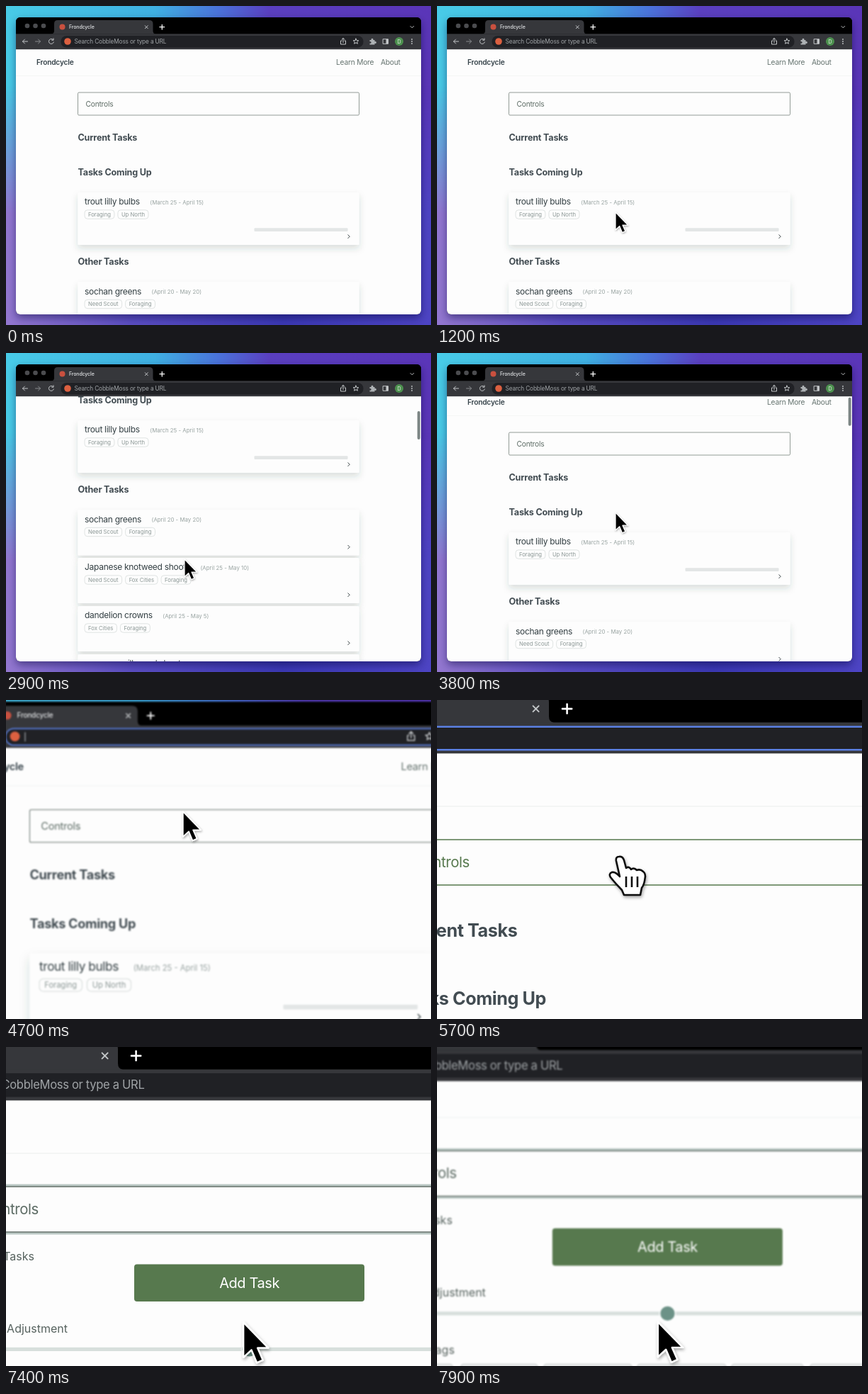
These frames come from a looping animation (600 px wide and 450 px high, 8 s). An HTML page:

```html
<!DOCTYPE html>
<html lang="en">
<head>
<meta charset="utf-8">
<title>Seasonal tasks</title>
<style>
  html, body { margin: 0; width: 100%; height: 100%; overflow: hidden; background: #4b3fc0; }
  svg { display: block; width: 100vw; height: 100vh; }
  text { font-family: Inter, "Open Sans", sans-serif; letter-spacing: -.02em; }
  .h { font-weight: 700; font-size: 12.6px; letter-spacing: -.016em; fill: #424c52; }
  .title { font-size: 12px; letter-spacing: -.024em; fill: #333f43; }
  .date { font-size: 7.85px; letter-spacing: 0; fill: #98a3a1; }
  .tag { font-size: 7.7px; letter-spacing: 0; fill: #8a9694; }
  .nav { font-size: 10.2px; fill: #65736f; }
  .label { font-size: 8px; letter-spacing: 0; fill: #56625e; }
  .icon { fill: none; stroke: #c3c6c8; stroke-width: 1; stroke-linecap: round; stroke-linejoin: round; }
</style>
</head>
<body>
<svg id="stage" viewBox="0 0 600 450" xmlns="http://www.w3.org/2000/svg">
  <defs>
    <linearGradient id="sky" x1="0" y1="0" x2="1" y2="0">
      <stop offset="0" stop-color="#48cbe7"/><stop offset=".35" stop-color="#3fb0e2"/>
      <stop offset=".5" stop-color="#4a72da"/><stop offset=".62" stop-color="#5a3fc0"/>
      <stop offset="1" stop-color="#5a35b8"/>
    </linearGradient>
    <linearGradient id="ground" x1="0" y1="0" x2="1" y2="0">
      <stop offset="0" stop-color="#9377d0"/><stop offset=".3" stop-color="#5a4dc2"/>
      <stop offset=".65" stop-color="#3b38b4"/><stop offset="1" stop-color="#4d44c4"/>
    </linearGradient>
    <linearGradient id="fade" x1="0" y1="0" x2="0" y2="1">
      <stop offset=".25" stop-color="#fff" stop-opacity="0"/><stop offset=".65" stop-color="#fff"/>
    </linearGradient>
    <mask id="lower"><rect width="600" height="450" fill="url(#fade)"/></mask>
    <clipPath id="frame"><rect x="14" y="16" width="572" height="419" rx="6"/></clipPath>
    <clipPath id="view"><rect x="14" y="61" width="572" height="374"/></clipPath>
    <clipPath id="fold"><rect id="foldBox" x="90" y="156" width="420" height="0"/></clipPath>
    <filter id="soft" x="-10%" y="-40%" width="120%" height="200%">
      <feDropShadow dx="0" dy="5" stdDeviation="5" flood-color="#2f4540" flood-opacity=".17"/>
    </filter>
    <filter id="lift" x="-10%" y="-10%" width="120%" height="125%">
      <feDropShadow dx="0" dy="5" stdDeviation="6" flood-color="#101030" flood-opacity=".45"/>
    </filter>
    <filter id="drop" x="-50%" y="-50%" width="200%" height="200%">
      <feDropShadow dx=".6" dy="1.2" stdDeviation="1" flood-opacity=".35"/>
    </filter>
  </defs>
  <g id="camera">
    <g id="scene">
      <rect width="600" height="450" fill="url(#sky)"/>
      <rect width="600" height="450" fill="url(#ground)" mask="url(#lower)"/>
      <rect x="14" y="16" width="572" height="419" rx="6" fill="#000" filter="url(#lift)"/>
      <g clip-path="url(#frame)">
        <rect x="14" y="61" width="572" height="374" fill="#fdfdfd"/>
        <g clip-path="url(#view)">
          <g id="page">
            <text x="43" y="83" font-size="10.2" font-weight="600" fill="#36434a">Frondcycle</text>
            <text class="nav" x="466" y="83">Learn More</text>
            <text class="nav" x="529" y="83">About</text>
            <path d="M14 98.500H586" stroke="#f2f4f3" stroke-width=".7"/>
            <rect id="focus" x="100.800" y="121.200" width="398.400" height="33.600" rx="2.500"
              fill="none" stroke="#b9c7c3" stroke-width="1.800"/>
            <rect id="box" x="101.500" y="122" width="397" height="32" rx="1.500" fill="#fdfdfd" stroke-width=".7"/>
            <text id="boxLabel" x="112.500" y="141.500" font-size="10.200">Controls</text>
            <g id="panel" clip-path="url(#fold)"></g>
            <g id="list"></g>
          </g>
          <rect id="thumb" x="580.700" width="4" height="40" rx="2" fill="#7d8685"/>
        </g>
        <g id="chrome"></g>
      </g>
    </g>
    <g id="arrow" filter="url(#drop)">
      <path transform="scale(.95)" d="M0 0V26L6 20.500L10 30L14.500 28L10.500 19H18.500Z" fill="#000" stroke="#fff" stroke-width="1.300" stroke-linejoin="round"/>
    </g>
    <g id="hand" filter="url(#drop)">
      <g transform="scale(.5)" stroke-linejoin="round">
        <path d="M-5 5Q-6 -1 -1 -1Q4 -2 6 4L9 15Q13 12 16 17Q20 14 24 18Q29 16 33 20Q36 22 36 27Q35 38 31 43L29 53H6L3 46Q-6 37 -13 28Q-16 23 -11 21Q-6 20 0 27Z"
          fill="#fff" stroke="#111" stroke-width="2.600"/>
        <path d="M9 27V42M17 27V42M25 27V42" stroke="#111" stroke-width="2.600"/>
      </g>
    </g>
  </g>
</svg>
<script>
const LOOP = 8000, STEP = 100, PANEL_HEIGHT = 190;
const $ = id => document.getElementById(id);
const move = (id, x, y, s = 1) => $(id).setAttribute('transform', `translate(${x} ${y}) scale(${s})`);
const show = (id, on) => $(id).setAttribute('visibility', on ? 'visible' : 'hidden');
const smooth = x => { x = Math.min(1, Math.max(0, x)); return x * x * (3 - 2 * x); };
const ramp = (t, from, to) => smooth((t - from) / (to - from));

const tasks = [
  { y: 263, h: 74, name: 'trout lilly bulbs', dates: 'March 25 - April 15', tags: ['Foraging', 'Up North'], bar: true },
  { y: 389.5, name: 'sochan greens', dates: 'April 20 - May 20', tags: ['Need Scout', 'Foraging'] },
  { y: 457, name: 'Japanese knotweed shoots', dates: 'April 25 - May 10', tags: ['Need Scout', 'Fox Cities', 'Foraging'] },
  { y: 525, name: 'dandelion crowns', dates: 'April 25 - May 5', tags: ['Fox Cities', 'Foraging'] },
  { y: 593, name: 'common milkweed shoots', dates: 'May 1 - May 20', tags: ['Foraging'] }
];

function buildChrome() {
  const dots = [30, 41.5, 53].map(x => `<circle cx="${x}" cy="28" r="3.3" fill="#4b4c4f"/>`).join('');
  const menu = [47, 50, 53].map(y => `<circle cx="573" cy="${y}" r=".9" fill="#c3c6c8"/>`).join('');
  const star = Array.from({ length: 10 }, (_, i) => {
    const r = i % 2 ? 1.8 : 4, a = i * Math.PI / 5 - Math.PI / 2;
    return `${494 + r * Math.cos(a)},${50 + r * Math.sin(a)}`;
  }).join(' ');
  $('chrome').innerHTML = `
    <rect x="14" y="16" width="572" height="24" fill="#000"/>${dots}
    <path d="M64 39.5Q68 39 68 35V25Q68 20 73 20H202Q207.5 20 207.5 25V35Q207.5 39 211 39.5Z" fill="#36373b"/>
    <circle cx="79.5" cy="29.5" r="4" fill="#c9503f"/>
    <text x="89" y="32" font-size="7" font-weight="500" fill="#e4e6e8">Frondcycle</text>
    <path class="icon" d="M196.3 27.7l4 4m0-4l-4 4"/>
    <path class="icon" style="stroke:#fff;stroke-width:1.3" d="M217 29.7h6.6m-3.3-3.3v6.6"/>
    <path class="icon" d="M571 28.5l2.3 2.3l2.3-2.3"/>
    <rect x="14" y="39.3" width="572" height="21.9" fill="#36373b"/>
    <rect x="77.5" y="42" width="427" height="16.7" rx="8" fill="#202125"/>
    <rect id="ring" x="77.8" y="42.4" width="426.5" height="16.2" rx="8" fill="none" stroke="#5b80e2" stroke-width="1.2"/>
    <path class="icon" d="M30.5 50H23.5m3-3l-3 3l3 3"/>
    <path class="icon" style="stroke:#888b8e" d="M41.5 50h7m-3-3l3 3l-3 3"/>
    <path class="icon" d="M66.5 47.5a3.5 3.5 0 1 0 .8 3.5M67 45.8v2.4h-2.4"/>
    <circle cx="87" cy="50" r="4.8" fill="#dc6040"/>
    <text id="hint" x="96.5" y="53" font-size="8.3" fill="#a0a4a7">Search CobbleMoss or type a URL</text>
    <path id="caret" d="M97 46V55" stroke="#bfc4ca" stroke-width=".7"/>
    <path class="icon" d="M474 49h-1.5v5h7v-5H478M476 51.5V45.5m-2 1.8l2-2l2 2"/>
    <polygon class="icon" points="${star}"/>
    <path d="M513.5 48h2.2a1.5 1.5 0 1 1 2.6 0h2.2v2.2a1.5 1.5 0 1 1 0 2.4v1.9h-7v-1.9a1.4 1.4 0 1 0 0-2.4Z" fill="#aeb2b5"/>
    <rect class="icon" x="532.5" y="46.7" width="7" height="6.6"/>
    <rect x="536.5" y="47" width="3" height="6" fill="#c3c6c8"/>
    <circle cx="555" cy="50" r="6" fill="#4d914f"/>
    <text x="555" y="52.6" font-size="7" text-anchor="middle" fill="#eef5ee">D</text>${menu}`;
}

function buildPanel() {
  const label = (x, y, s) => `<text class="label" x="${x}" y="${y}" text-anchor="end">${s}</text>`;
  const chips = [[101.5, 47], [154.5, 54], [213, 62], [279, 62.5], [345.5, 50.5], [401, 56]];
  $('panel').innerHTML = `
    ${label(148.5, 174, 'Create Tasks')}
    <rect x="219" y="176.7" width="162.5" height="26.3" rx="2" fill="#57794e"/>
    <text x="300.3" y="193.4" font-size="10" text-anchor="middle" fill="#fff">Add Task</text>
    ${label(172, 225, 'Season Adjustment')}
    <rect x="101.5" y="235.4" width="397" height="2.6" rx="1.3" fill="#d7dfdc"/>
    <circle cx="300.3" cy="236.7" r="5.5" fill="#6c9287" stroke="#fff" stroke-width=".8"/>
    ${label(150, 265.5, 'Filter by Tags')}
    ${chips.map(([x, w]) => `<rect x="${x}" y="272.5" width="${w}" height="17" rx="2" fill="#eceeee" stroke="#cfd3d2" stroke-width=".8"/>`).join('')}`;
}

function buildList() {
  const heading = (y, s) => `<text class="h" x="101.5" y="${y}">${s}</text>`;
  $('list').innerHTML = heading(190.3, 'Current Tasks') + heading(238.5, 'Tasks Coming Up') +
    heading(365.4, 'Other Tasks') + tasks.map(({ y, h = 64, name, dates, tags, bar }) => `
      <g transform="translate(101.5 ${y})">
        <rect width="397" height="${h}" rx="1.5" fill="#fdfdfd" filter="url(#soft)"/>
        <text class="title" x="9.5" y="17">${name}</text>
        <text class="date" y="16.8">(${dates})</text>
        ${tags.map(s => `<g class="pill"><rect y="24.8" height="12.4" rx="4" fill="none" stroke="#d3d9d7" stroke-width=".7"/><text class="tag" x="5" y="33.8">${s}</text></g>`).join('')}
        ${bar ? '<rect x="249" y="50.3" width="132" height="4.6" rx="1" fill="#e3e6e6"/>' : ''}
        <path d="M381 ${h - 14.5}l2.7 2.7l-2.7 2.7" fill="none" stroke="#3f494b" stroke-width="1"/>
      </g>`).join('');

  // Dates and pills flow after the measured text.
  for (const card of $('list').querySelectorAll('g[transform]')) {
    const width = card.querySelector('.title').getComputedTextLength();
    card.querySelector('.date').setAttribute('x', 9.5 + width + 14.5);
    let x = 9.5;
    for (const pill of card.querySelectorAll('.pill')) {
      const w = pill.querySelector('text').getComputedTextLength() + 10;
      pill.querySelector('rect').setAttribute('width', w);
      pill.setAttribute('transform', `translate(${x} 0)`);
      x += w + 5;
    }
  }
}

// Each stop is [time, x, y] or [time, scroll]; motion eases between stops.
const pointerStops = [
  [600, 262, 460], [1200, 252, 291], [3500, 252, 291], [4200, 252, 123.8], [4800, 252, 123.8],
  [5300, 257.5, 134.5], [6150, 257.5, 134.5], [6600, 306.5, 164], [6900, 306.5, 164], [7600, 293.5, 231]
];
const scrollStops = [
  [1300, 0], [1900, 70], [2400, 130], [2900, 168], [3200, 180], [3900, 0], [7600, 0], [8100, 18]
];

function along(stops, t) {
  const next = stops.findIndex(s => s[0] > t);
  if (next === 0) return stops[0].slice(1);
  if (next < 0) return stops[stops.length - 1].slice(1);
  const a = stops[next - 1], b = stops[next], p = ramp(t, a[0], b[0]);
  return a.slice(1).map((v, i) => v + (b[i + 1] - v) * p);
}

function cameraAt(t) {
  const zoom = ramp(t, 4150, 5350), pan = ramp(t, 7400, 8500);
  return [-257 * zoom - 42 * pan, -47 * zoom - 63 * pan, 1 + zoom];
}

function draw(t) {
  const camera = cameraAt(t), before = cameraAt(t - STEP);
  move('camera', ...camera);
  const speed = Math.hypot(camera[0] - before[0], camera[1] - before[1]);
  $('scene').style.filter = speed > 1 ? `blur(${Math.min(.6, speed / 20)}px)` : 'none';

  const [scroll] = along(scrollStops, t);
  move('page', 0, -scroll);
  $('thumb').setAttribute('y', 61.5 + scroll * .122);
  $('thumb').setAttribute('opacity', ramp(t, 1300, 1400) * (1 - ramp(t, 3900, 4200)));

  const typing = t >= 3900 && t < 6050;
  show('ring', typing);
  show('caret', typing && t % 1000 >= 500 && t < 5500);
  show('hint', !typing);

  const open = PANEL_HEIGHT * ramp(t, 6050, 6400);
  show('focus', t >= 6050);
  $('foldBox').setAttribute('height', open);
  move('list', 0, open);

  const [x, y] = along(pointerStops, t), pointing = t >= 5000 && t < 6300;
  move('arrow', x, y);
  move('hand', x, y);
  show('arrow', t >= 600 && !pointing);
  show('hand', pointing);
  $('box').setAttribute('stroke', pointing ? '#57794e' : '#65726b');
  $('boxLabel').setAttribute('fill', pointing ? '#57794e' : '#5c6b64');
}

buildChrome();
buildPanel();
buildList();
const start = performance.now();
function tick() {
  const t = (performance.now() - start) % LOOP;
  draw(Math.floor(t / STEP) * STEP);
  requestAnimationFrame(tick);
}
draw(0);
requestAnimationFrame(tick);
</script>
</body>
</html>
```
